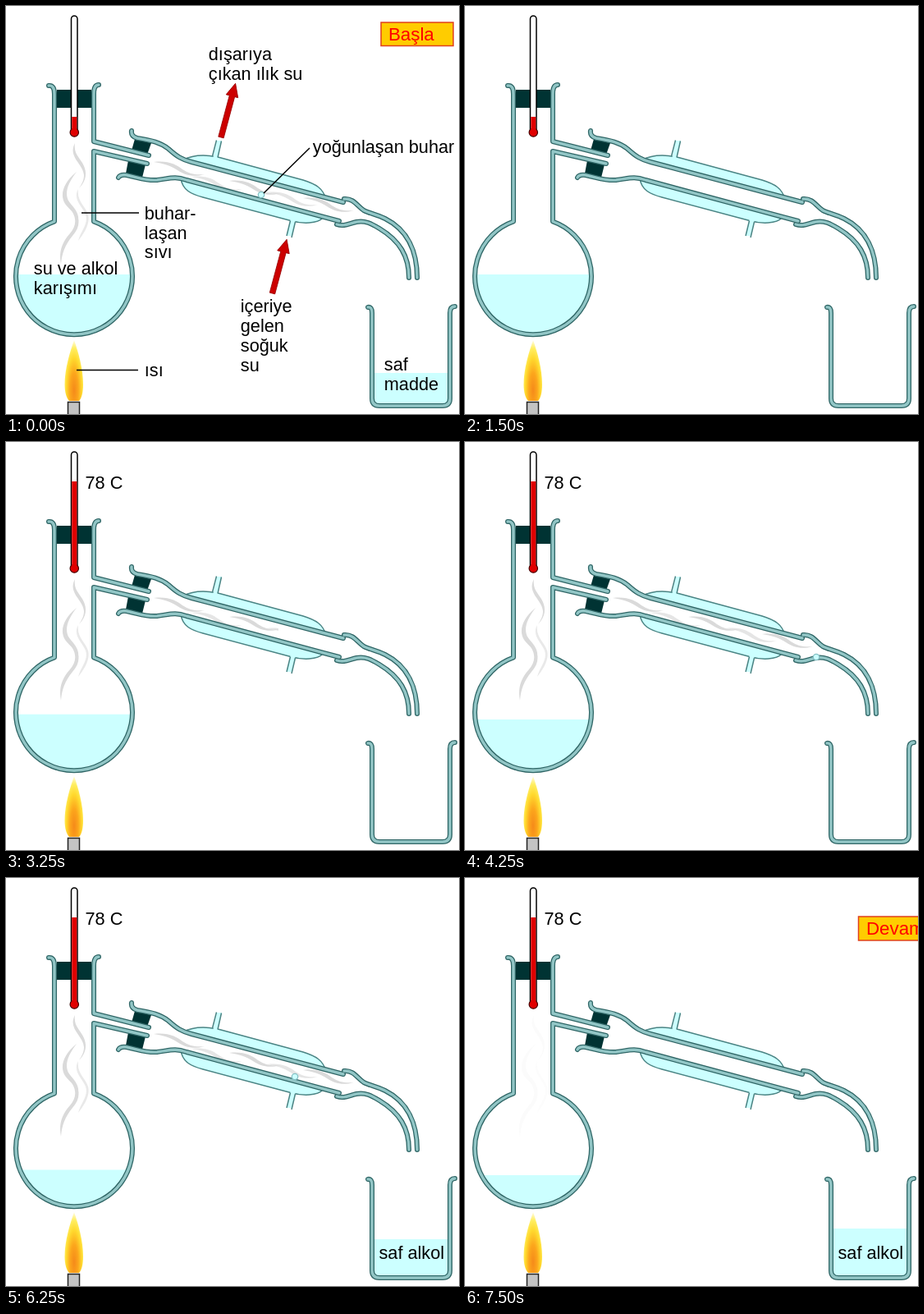
These frames come from a looping animation (552 px wide and 497 px high, 8000 ms). An HTML page:

```html
<!DOCTYPE html>
<html lang="tr">
<head>
<meta charset="utf-8">
<title>Damıtma</title>
<style>
  html, body { margin: 0; width: 100%; height: 100%; overflow: hidden; background: #fff; }
  svg { display: block; width: 552px; height: 497px; }
  text { font: 21.7px "Liberation Sans", Arial, sans-serif; fill: #000; }
  .button text { font-size: 22.3px; fill: #f00; }
  .button rect { fill: #fc0; stroke: #e0401c; stroke-width: 1.5; }
  .water { fill: #cff; }
  .thin { stroke: #4a8484; stroke-width: 1.5; }
  .glass { fill: none; stroke-linecap: round; stroke-linejoin: round; }
  .edge { stroke: #2f6666; stroke-width: 6; }
  .core { stroke: #92c6c6; stroke-width: 3.4; }
  .cork { fill: #033; }
  .steam { fill: #dadada; }
  .pointer { stroke: #000; stroke-width: 1.5; }
  .drop { fill: #cff; stroke: #84c0c4; stroke-width: 1.3; }
</style>
</head>
<body>
<svg viewBox="0 0 552 497">
  <defs>
    <radialGradient id="fire" gradientUnits="userSpaceOnUse" cx="83" cy="468" r="60" gradientTransform="translate(83 0) scale(.24 1) translate(-83 0)">
      <stop offset="0" stop-color="#f58a1a"/>
      <stop offset=".35" stop-color="#fca61c"/>
      <stop offset=".65" stop-color="#ffd92e"/>
      <stop offset=".85" stop-color="#ffee60"/>
      <stop offset="1" stop-color="#fffbd8"/>
    </radialGradient>
    <clipPath id="bulb"><circle cx="83" cy="329.500" r="70"/></clipPath>
    <clipPath id="cup"><path d="M446 370V478Q446 487 455 487H532Q541 487 541 478V370Z"/></clipPath>
    <clipPath id="wipe"><rect id="wipeBox" x="170" y="150" width="270" height="140"/></clipPath>
    <path id="arrow" d="M-3.300 0V-52H-7.500L0-68L7.500-52H3.300V0Z" fill="#c00" stroke="#900" stroke-width=".8"/>
    <path id="wisp" d="M0 0C18-2 27 3 35 9C44 15 52 16 62 15C48 19 38 16 29 10C20 4 12 2 0 0Z"/>
    <g id="pipes">
      <path d="M52 97Q59 96 59 107V262.500A71 71 0 1 0 107 262.500V177L172 192"/>
      <path d="M113 96Q107 96 107 107V165L174 182"/>
      <path d="M153 152Q152 159 160 161C178 164 188 166 198 174C208 183 214 187 226 190L411 239"/>
      <path d="M137 209Q139 205 147 206C162 209 170 213 184 212C200 210 206 207 220 212L406 262"/>
      <path d="M412 235C424 234 428 244 436 249C444 253 452 254 462 259C490 273 501 300 501 331"/>
      <path d="M403 266C412 269 418 265 427 263C438 261 445 265 455 271C480 286 491 305 491 331"/>
      <path d="M441 367Q446 366 446 374V478Q446 487 455 487H532Q541 487 541 478V374Q541 366 547 366"/>
    </g>
  </defs>

  <g clip-path="url(#bulb)"><rect id="mixture" class="water" x="8" width="150" height="90"/></g>
  <g clip-path="url(#cup)"><rect id="distillate" class="water" x="446" width="96" height="80"/></g>

  <path class="water thin" d="M215 188C230 180 246 181 262 185L362 212C378 217 386 222 390 235L386 258C380 265 362 266 345 261L240 233C225 229 215 224 213 210Z"/>
  <path class="water" d="M252 186L257 164H263L257 188ZM347 258L342 280H348L353 260Z"/>
  <path class="thin" fill="none" d="M251.500 183L256.500 163.500M258 184.500L262.500 164.500M346.500 261.500L342 280M352.500 263L348 282"/>
  <path fill="#fff" d="M160 161C178 164 188 166 198 174C208 183 214 187 226 190L411 239L406 262L220 212C206 207 200 210 184 212L147 206Z"/>

  <g id="flaskSteam" class="steam">
    <path d="M84 167C75 184 94 192 95 206C95 213 92 217 89 222C99 212 98 202 95 195C91 185 82 181 84 167Z"/>
    <path d="M86 202C70 215 65 230 72 241C79 250 87 254 88 264C90 250 81 245 76 237C71 227 76 215 86 202Z"/>
    <path d="M77 245C87 258 86 267 78 277C68 288 64 300 67 315C68 301 72 291 81 280C92 268 91 255 77 245Z"/>
    <path opacity=".6" d="M88 223C81 236 93 244 97 254C101 265 91 274 88 286C96 276 103 264 100 254C97 244 86 238 88 223Z"/>
  </g>
  <g clip-path="url(#wipe)">
    <g id="tubeSteam" class="steam">
      <use href="#wisp" x="180" y="190"/>
      <use href="#wisp" x="226" y="208" opacity=".7"/>
      <use href="#wisp" x="272" y="213"/>
      <use href="#wisp" x="318" y="227" opacity=".7"/>
      <use href="#wisp" x="362" y="234"/>
    </g>
  </g>

  <path class="cork" d="M62 102H104V124H62ZM157 162L177 167L172 181L153 176ZM149 188L170 193L166 209L146 204Z"/>
  <use href="#pipes" class="glass edge"/>
  <use href="#pipes" class="glass core"/>

  <rect x="79.500" y="12" width="7.500" height="145" rx="3.700" fill="#fff" stroke="#000" stroke-width="1.500"/>
  <circle cx="83.300" cy="154" r="5.200" fill="#e00000" stroke="#400" stroke-width="1.200"/>
  <rect id="mercury" x="80.300" width="6" fill="#e00000"/>

  <path fill="url(#fire)" d="M83 407C78 421 71.500 442 71.500 461C71.500 471 74 478 77 481H89C92 478 94 471 94 461C94 442 88 421 83 407Z"/>
  <rect x="75.500" y="482.500" width="14" height="18" fill="#c4c4c4" stroke="#222" stroke-width="1.500"/>

  <circle id="dropA" class="drop" r="3.700"/>
  <circle id="dropB" class="drop" r="3.700"/>

  <g id="labels">
    <path class="pointer" d="M92 252H162M86 443.500H161M370 173L314 228"/>
    <use href="#arrow" transform="translate(262 160) rotate(15)"/>
    <use href="#arrow" transform="translate(324.500 350) rotate(15)"/>
    <g transform="translate(.8 .7)">
      <text x="246" y="65">dışarıya</text><text x="246" y="89">çıkan ılık su</text>
      <text x="373" y="178">yoğunlaşan buhar</text>
      <text x="168" y="259">buhar-</text><text x="168" y="283">laşan</text><text x="168" y="306">sıvı</text>
      <text x="33" y="326.500">su ve alkol</text><text x="33" y="350">karışımı</text>
      <text x="168" y="450">ısı</text>
      <text x="285" y="372">içeriye</text><text x="285" y="396">gelen</text>
      <text x="285" y="420">soğuk</text><text x="285" y="444">su</text>
      <text x="460" y="443">saf</text><text x="460" y="467">madde</text>
    </g>
    <g class="button"><rect id="startBox" x="457" y="20" width="88" height="28.500"/><text x="466" y="42">Başla</text></g>
  </g>
  <text id="temperature" x="96.500" y="56.500">78 C</text>
  <text id="product" x="454.500" y="463.500">saf alkol</text>
  <g id="next" class="button"><rect x="479.500" y="47" width="88" height="29"/><text x="489" y="69">Devam</text></g>

  <path id="pointer" fill="#fff" stroke="#000" d="M541 45V61L545 57.500L548 64L550.500 63L547.500 56.500H552Z"/>
  <path id="hand" fill="#fff" stroke="#000" stroke-width="1.200" d="M538.500 51V39Q540.500 36 542.500 39V48V44.500Q544.500 42.500 546.500 45V49V45.500Q548.500 43.500 550 46V49V47Q552 46 552.500 48.500V54L550 59H541L535.500 52Q533.500 48.500 536 48.500Z"/>
</svg>
<script>
  const LOOP = 8000, STEP = 250, DROP_PERIOD = 750;
  const $ = id => document.getElementById(id);
  const clamp = (v, lo, hi) => Math.min(hi, Math.max(lo, v));
  const ramp = (t, t0, t1, a, b) => a + (b - a) * clamp((t - t0) / (t1 - t0), 0, 1);
  const show = (id, on) => $(id).setAttribute("visibility", on ? "visible" : "hidden");
  const set = (id, attrs) => { for (const k in attrs) $(id).setAttribute(k, attrs[k]); };

  // Condensed drop: forms, slides down the tube, then falls from the outlet.
  const dropPath = [[311, 230], [352, 242], [428, 262], [491, 349]];

  function placeDrop(id, age, on) {
    const point = dropPath[age / STEP];
    show(id, on && point);
    if (point) set(id, { cx: point[0], cy: point[1] });
  }

  function draw(t) {
    const intro = t < 1500;
    show("labels", intro);
    show("pointer", t === 750);
    show("hand", t >= 1000 && intro);
    $("startBox").style.fill = t >= 1000 ? "#ff0" : "#fc0";
    show("temperature", t >= 2750);
    show("product", t >= 4750);
    show("next", t >= 7000);

    const heat = intro ? 135 : clamp(135 - 59 * (t - 1500) / 750, 48, 135);
    set("mercury", { y: heat, height: 155 - heat });

    const mixture = t < 4250 ? ramp(t, 2500, 4250, 327, 338) : ramp(t, 4250, 7000, 338, 362);
    set("mixture", { y: mixture });
    set("distillate", { y: intro ? 447 : clamp(487 - .0235 * (t - 4250), 427, 490) });

    const fade = ramp(t, 6250, 7000, 1, 0);
    set("flaskSteam", { opacity: intro ? 1 : Math.max(.1, fade) * ramp(t, 1500, 2500, 0, 1) });
    set("tubeSteam", { opacity: fade });
    set("wipeBox", { width: intro ? 270 : ramp(t, 2500, 3750, 0, 270) });

    const age = t % DROP_PERIOD;
    placeDrop("dropA", intro ? 0 : age, intro || (t >= 3750 && t < 6750));
    placeDrop("dropB", age + DROP_PERIOD, t >= 4500 && t < 7000);
  }

  function frame() {
    draw(Math.floor(performance.now() % LOOP / STEP) * STEP);
    requestAnimationFrame(frame);
  }
  frame();
</script>
</body>
</html>
```
